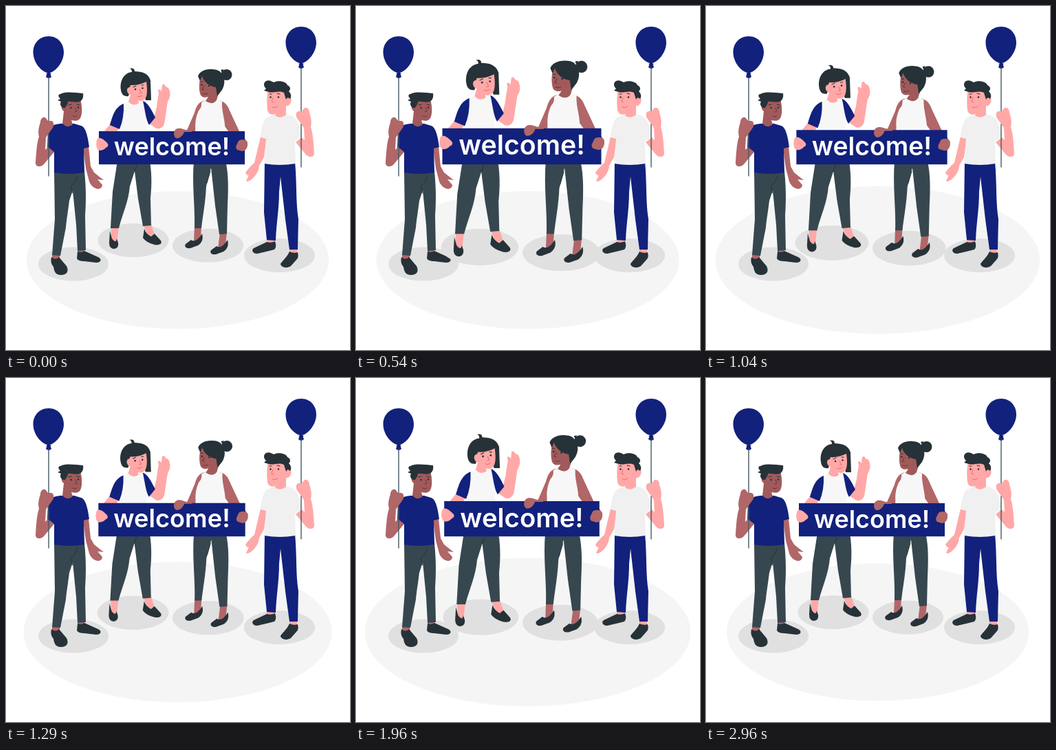
Animation of 500x500 px, one loop 3000 ms. Source, as an HTML page:

```html
<!DOCTYPE html>
<html lang="en">
<head>
<meta charset="utf-8">
<title>Welcome</title>
<style>
  html, body { margin: 0; width: 100%; height: 100%; overflow: hidden; background: #fff; }
  svg { display: block; width: 100%; height: 100%; }
  .navy { fill: #12217c; }
  .dark { fill: #263238; }
  .slate { fill: #37474f; }
  .light { fill: #ffa8a7; }
  .brown { fill: #b16668; }
  .face { fill: #a05a5b; }
  .white { fill: #f7f7f7; }
  .grey { fill: #f0f0f0; }
  .shadow { fill: #e0e0e0; }
  .line { fill: none; stroke: #263238; stroke-width: 1; stroke-linecap: round; }
  .pink { stroke: #e8706f; }
  .maroon { stroke: #6f3436; }
  .string { stroke: #455a64; stroke-width: 1.4; }
  text { font: 600 36px Inter, "Open Sans", sans-serif; fill: #fff; text-anchor: middle; }
</style>
</head>
<body>
<svg viewBox="0 0 500 500">
  <defs>
    <g id="balloon">
      <path class="navy" d="M62 44C76 44 84 55 84 67C84 82 72 95 64 97L66 103Q62 107 58 103L60 97C51 95 39.500 82 39.500 67C39.500 55 48 44 62 44Z"/>
      <path fill="none" stroke="#0d1860" d="M58.500 98Q62 100 65.500 98"/>
    </g>
    <path id="raisedArm" d="M50 169C50 163 55 160 58 163L61 167L66 167C70 168 70 174 68 177L63 184L58 191L57 209L61 205L70 212L55 230C50 235 43 234 43 228C44 212 45 198 48 190C46 182 48 175 50 169Z"/>
    <path id="flat" d="M285 331C287 338 285 344 279 348L268 352C261 353 259 349 261 346L269 340Q276 345 285 331Z"/>
  </defs>

  <ellipse id="floor" cx="249.500" cy="369.300" rx="219.500" ry="100" fill="#f5f5f5"/>
  <ellipse class="shadow" cx="98" cy="375" rx="51" ry="24.500"/>
  <ellipse class="shadow" cx="397.500" cy="362.500" rx="51.500" ry="24.500"/>

  <g id="leftMan">
    <use href="#balloon"/>
    <path class="line string" d="M62 104V170"/>
    <path class="brown" d="M67 360H78V368H67ZM104 352H114V360H104Z"/>
    <path class="dark" d="M66 365Q72 370 77 365L88 378C92 386 88 391 80 391C72 391 70 386 69 379C65 374 65 370 66 365ZM104 357Q110 359 114 356L134 365C140 368 138 373 131 373L114 371Q105 371 103 367Z"/>
    <path class="slate" d="M70 240H114C117 270 116 290 115 305L116 355L104 356L102 318L97 268L92 283C90 300 88 310 87 322L79 363L67 362L71 310Z"/>
    <path class="line" d="M104 247Q101 257 94 262L97 272"/>
    <path class="brown" d="M112 206L120 204L123 233L128 242L138 250L142 253L133 252L140 260Q140 265 134 266C128 265 123 261 121 255L116 236Z"/>
    <path class="navy" d="M82 171C74 171 64 173 61 181L60 207L70 213L70 242Q92 246 114 242L113 207L121 205C119 190 116 176 109 174L99 171Z"/>
    <path class="face" d="M86 138L108 135C111 147 111 157 108 163C105 168 99 167 95 166L97 172Q90 179 82 171L84 153C80 150 79 144 84 143Z"/>
    <path class="dark" d="M83 148C79 146 78 142 80 139L75 137L79 135C75 131 76 128 79 128C86 124 101 126 112 127C113 133 111 137 107 139C100 141 95 138 90 139C90 143 87 145 86 148Z"/>
    <circle class="dark" cx="94.500" cy="148" r="1.300"/>
    <circle class="dark" cx="105" cy="147.500" r="1.300"/>
    <path class="line" d="M91 144L95 143M103 143L107 144"/>
    <path class="line maroon" d="M101 148L103 153L100 154M97 160Q100 162 103 160"/>
    <use href="#raisedArm" class="brown"/>
    <path class="line string" d="M62 186V247"/>
  </g>

  <g id="rightMan">
    <use href="#balloon" x="367" y="-14"/>
    <path class="line string" d="M429 90V160"/>
    <path class="light" d="M379 337H391V346H379ZM412 351H423V361H412Z"/>
    <path class="dark" d="M379 343Q385 345 391 342Q394 350 390 354L378 357L365 360C359 360 356 355 360 352ZM412 357Q418 360 424 358Q426 366 422 369L414 378C408 382 400 380 399 375C400 372 408 366 412 357Z"/>
    <path class="navy" d="M376 226H420C423 260 421 285 425 310L424 354L412 354L406 310L399 248L397 270C397 295 393 315 392 341L379 340L375 300Z"/>
    <path class="light" d="M370 190L379 192L375 220L368 232C368 240 362 248 357 252C353 255 350 256 349 254L353 246Q350 247 348 242C351 238 356 232 361 228Z"/>
    <use href="#raisedArm" class="light" transform="translate(491 -14) scale(-1 1)"/>
    <path class="grey" d="M390 158L379 162C373 168 371 180 370 191L378 193L375 229Q398 233 421 229L420 197L430 189C427 177 424 163 414 159L406 157Z"/>
    <path class="light" d="M381 122L404 120L408 133C413 130 416 135 414 140C412 145 408 146 407 145L407 158Q398 165 391 159L392 157C386 159 381 157 380 151C379 141 379 130 381 122Z"/>
    <path class="dark" d="M382 125L375 123L378 120C374 117 374 111 378 109C382 107 386 109 389 111C396 107 408 110 409 115C414 117 414 122 411 124C415 128 415 132 413 135Q409 131 407 136L404 126C396 122 389 127 382 125Z"/>
    <circle class="dark" cx="384.500" cy="132.500" r="1.300"/>
    <circle class="dark" cx="396" cy="132.500" r="1.300"/>
    <path class="line" d="M383 128L386 128M394 127L398 128"/>
    <path class="line pink" d="M388 133L386 139L389 140M387 147Q391 149 395 146"/>
    <path class="line string" d="M429 172V234"/>
  </g>

  <g id="bannerGroup">
    <ellipse class="shadow" cx="185" cy="340.500" rx="51.500" ry="24.500"/>
    <ellipse class="shadow" cx="293.500" cy="348" rx="51.500" ry="24.500"/>

    <g id="leftWoman">
      <path class="light" d="M153 320L164 321L161 345L153 341ZM199 317L211 317L217 335L206 333Z"/>
      <path class="dark" d="M151 327L154 338Q160 346 161 338L163 344C164 350 161 353 156 353Q150 352 150 344ZM201 324Q204 332 211 335L216 331L225 341C228 346 222 348 216 347Q204 344 199 337Z"/>
      <path class="slate" d="M162 225H209C213 250 211 268 210 280L211 319L199 320L192 280L187 240L180 262C178 285 170 300 164 323L152 323L155 270Z"/>
      <path class="line" d="M187 240L190 232"/>
      <path class="light" d="M152 171L164 177L158 190L140 200L132 195Z"/>
      <path class="light" d="M215 163L219 147C220 138 221 132 222 128L221 122Q224 120 226 124L227 115Q230 112 232 117L236 119C240 126 239 133 235 139C233 150 232 162 230 171C228 178 221 180 217 177L207 170Z"/>
      <path class="white" d="M178 138L202 138C205 150 206 165 204 184H167C167 165 165 155 168 145Z"/>
      <path class="navy" d="M171 142C158 147 155 160 151 173L165 179Q172 163 171 142ZM199 138C206 140 212 152 217 162L208 173C203 165 202 150 199 138Z"/>
      <path class="dark" d="M183 96Q183 91 179 91Q187 89 187 95C198 95 207 98 210 108L211 137L203 137L200 124H180L178 131C172 132 168 129 167 122C165 108 172 97 183 96Z"/>
      <path class="light" d="M181 115Q192 116 204 110C206 124 205 133 201 136C197 139 194 138 192 137L193 141Q185 147 178 139L181 129C175 128 174 118 180 118Z"/>
      <circle class="dark" cx="188" cy="121" r="1.300"/>
      <circle class="dark" cx="198.500" cy="119.500" r="1.300"/>
      <path class="line" d="M185 118L189 116M197 115L200 115"/>
      <path class="line pink" d="M194 121L197 126L194 127M191 131Q195 133 198 130"/>
    </g>

    <g id="rightWoman">
      <path class="brown" d="M274 320H284L283 338L273 344ZM311 329H321L319 347L308 353Z"/>
      <use href="#flat" class="dark"/>
      <use href="#flat" class="dark" x="37" y="9"/>
      <path class="slate" d="M273 225H319C324 245 323 270 322 290L321 331L310 332L304 290L298 235L291 262C290 285 286 305 284 323L274 323C275 290 270 260 273 225Z"/>
      <path class="line" d="M297 240L292 257"/>
      <path class="brown" d="M291 137C281 138 277 144 274 155L262 183H275L278 165ZM307 137C318 138 322 144 325 152L339 182L351 198L340 206L311 165Z"/>
      <path class="white" d="M284 140L291 136L308 136L314 139C313 155 320 168 318 184H276C274 170 276 161 280 152Q285 147 284 140Z"/>
      <circle class="dark" cx="320.500" cy="100" r="8"/>
      <path class="dark" d="M312 93L316 92L315 99Z"/>
      <path class="face" d="M283 102L306 108L309 127L306 137Q300 145 290 138L294 132C288 134 283 132 282 127C280 118 281 110 283 102Z"/>
      <path class="dark" d="M279 102C281 95 291 91 300 92C307 92 313 95 314 100C319 106 318 115 314 122L307 131L305 118C296 117 288 111 285 102L282 109Z"/>
      <circle class="dark" cx="284.500" cy="114.500" r="1.300"/>
      <circle class="dark" cx="295" cy="116" r="1.300"/>
      <path class="line" d="M283 110L286 110M294 112L298 113"/>
      <path class="line maroon" d="M288 116L285 121L288 122M286 127Q289 129 293 127"/>
    </g>

    <path class="navy" d="M135 182H347V230.300H135Z"/>
    <text x="241" y="217.500">welcome!</text>
    <path class="light" d="M134 192C139 191 144 196 147 199C150 202 148 205 145 206C143 209 136 212 133 208C130 203 131 195 134 192Z"/>
    <path class="brown" d="M247 179C252 176 258 179 261 180L270 181V183L259 183C257 189 252 193 247 192C243 189 243 182 247 179ZM338 196C342 193 350 194 351 199C352 206 348 211 343 211L336 209Q333 206 335 202Z"/>
  </g>
</svg>
<script>
  const LOOP = 3000;
  const FLOOR_BEAT = 787;
  const bannerGroup = document.getElementById("bannerGroup");
  const floor = document.getElementById("floor");

  // Linear interpolation through [time, scale] stops, holding the last value.
  function track(stops, t) {
    const i = stops.findIndex(([time]) => time > t);
    if (i < 0) return stops[stops.length - 1][1];
    const [t0, a] = stops[i - 1], [t1, b] = stops[i];
    return a + (b - a) * (t - t0) / (t1 - t0);
  }

  const groupStops = [[0, 1], [450, 1.1], [1350, 1], [1800, 1.1], [2250, 1]];
  const floorStops = [[0, 1], [345, 1.1], [545, 1]];

  function scaleAbout(node, x, y, s) {
    node.setAttribute("transform", `translate(${x} ${y}) scale(${s}) translate(${-x} ${-y})`);
  }

  function draw(now) {
    const t = now % LOOP;
    scaleAbout(bannerGroup, 241, 230, track(groupStops, t));
    scaleAbout(floor, 249.5, 369.3, track(floorStops, t % FLOOR_BEAT));
  }

  const start = performance.now();
  function tick() {
    draw(performance.now() - start);
    requestAnimationFrame(tick);
  }
  draw(0);
  requestAnimationFrame(tick);
</script>
</body>
</html>
```
